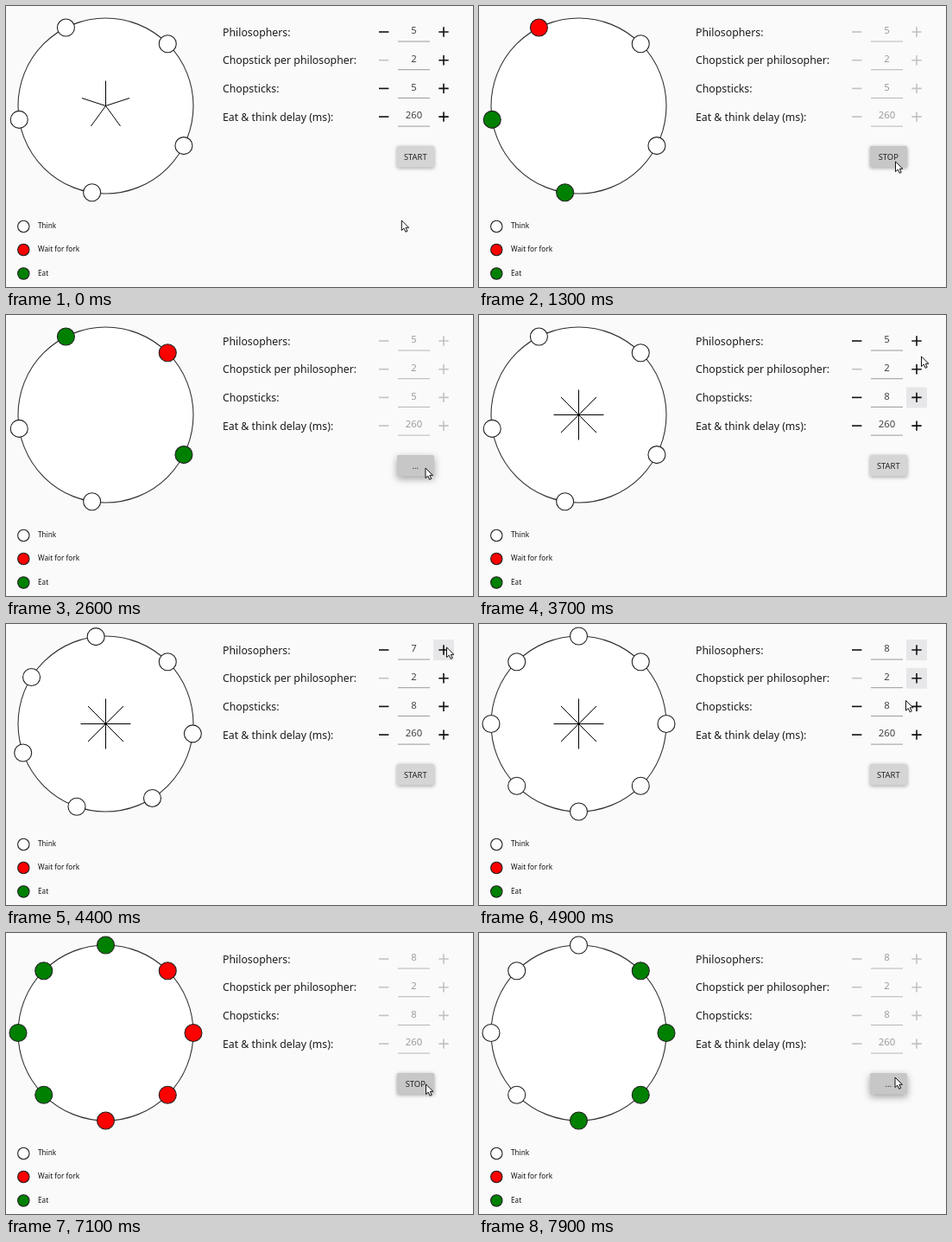
These frames come from a looping animation (541 px wide and 325 px high, 8000 ms). An HTML page:

```html
<!DOCTYPE html>
<html lang="en">
<head>
<meta charset="utf-8">
<title>Dining philosophers</title>
<style>
  html, body { margin: 0; width: 100%; height: 100%; overflow: hidden; background: #fafafa; }
  svg { display: block; width: 541px; height: 325px; font-family: "Noto Sans", "Open Sans", sans-serif; }
  .label { font-size: 12.3px; fill: #1c1c1c; }
  .value { font-size: 11.4px; text-anchor: middle; }
  .legend { font-size: 8.2px; font-weight: 500; fill: #111; }
  .caption { font-size: 9.4px; text-anchor: middle; fill: #222; }
</style>
</head>
<body>
<svg id="stage" viewBox="0 0 541 325"></svg>
<script>
const LOOP = 8000, STEP = 100;
const CENTER = 115.5, TABLE_R = 101.5, STICK = 29;
const FILL = { t: '#fff', w: '#f00', e: '#008000' };
const stage = document.getElementById('stage');

function add(tag, attrs, parent = stage, text) {
  const node = document.createElementNS('http://www.w3.org/2000/svg', tag);
  set(node, attrs);
  if (text) node.textContent = text;
  parent.appendChild(node);
  return node;
}
function set(node, attrs) {
  for (const key in attrs) node.setAttribute(key, attrs[key]);
}
const polar = (deg, r) => {
  const a = deg * Math.PI / 180;
  return [CENTER + r * Math.cos(a), CENTER + r * Math.sin(a)];
};
const within = (t, from, to) => t >= from && t < to;

// Last entry of [time, value] pairs that has already begun.
const latest = (track, t) => track.filter(([at]) => at <= t).pop()[1];

// Eased position along [time, x, y] points.
function along(points, t) {
  const i = points.findIndex(p => p[0] > t);
  if (i < 0) return points[points.length - 1].slice(1);
  if (i === 0) return points[0].slice(1);
  const [a, b] = [points[i - 1], points[i]];
  const k = (t - a[0]) / (b[0] - a[0]);
  const ease = k * k * (3 - 2 * k);
  return [1, 2].map(n => a[n] + (b[n] - a[n]) * ease);
}

const philosopherCount = [[0, 5], [4200, 6], [4400, 7], [4600, 8]];
const chopstickCount = [[0, 5], [3300, 6], [3500, 7], [3700, 8]];
const captions = [[0, 'START'], [800, 'STOP'], [2400, '...'], [2900, 'START'], [6000, 'STOP'], [7700, '...']];

// One letter per philosopher: think, wait, eat.
const firstHalf = 'eeeetttt', secondHalf = 'tttteeee';
const moods = [
  [0, ''], [1000, 'eewww'], [1300, 'tteew'], [1500, 'wette'], [1800, 'etwet'],
  [2000, 'twete'], [2300, 'wteew'], [2500, 'wette'], [2800, ''],
  [6200, 'eeeewwww'], [6400, secondHalf], [6700, firstHalf], [6900, secondHalf],
  [7100, 'wwwweeee'], [7200, firstHalf], [7400, secondHalf], [7700, firstHalf]
];

const cursorPath = [
  [200, 458.3, 248], [700, 480, 180], [1300, 482.5, 180], [2200, 482.5, 180],
  [2600, 486, 177], [2800, 482, 171], [2900, 476, 163], [3100, 505, 97], [3600, 505, 97],
  [3700, 512.5, 48], [3900, 510.5, 27], [4600, 510.5, 27], [4900, 494.5, 88.5],
  [5500, 486, 182], [5900, 486.5, 178], [6200, 486.5, 175], [7300, 486.5, 175],
  [7500, 489, 172], [7900, 482, 167]
];

add('circle', { cx: CENTER, cy: CENTER, r: TABLE_R, fill: '#fff', stroke: '#333', 'stroke-width': 1.1 });
const sticks = add('path', { fill: 'none', stroke: '#000', 'stroke-width': 1 });
const seats = Array.from({ length: 8 }, () =>
  add('circle', { r: 10, stroke: '#222', 'stroke-width': 1.1 }));

[['Think', 't', 255], ['Wait for fork', 'w', 282], ['Eat', 'e', 309.5]].forEach(([name, mood, y]) => {
  add('circle', { cx: 20.3, cy: y, r: 6.7, fill: FILL[mood], stroke: '#222', 'stroke-width': 1.1 });
  add('text', { x: 37, y: y + 2.2, class: 'legend' }, stage, name);
});

// hover: spans during which the plus button is highlighted
const fields = [
  { label: 'Philosophers:', value: t => latest(philosopherCount, t), hover: [[3800, 5000]] },
  { label: 'Chopstick per philosopher:', value: () => 2, locked: true, hover: [[4800, 5100]] },
  { label: 'Chopsticks:', value: t => latest(chopstickCount, t), hover: [[2900, 3900], [5000, 5200]] },
  { label: 'Eat & think delay (ms):', value: () => 260, hover: [] }
].map((field, i) => {
  const y = 30 + i * 32.7;
  const icon = d => add('path', { d, fill: 'none', 'stroke-width': 1.6 });
  add('text', { x: 251, y: y + 4.7, class: 'label' }, stage, field.label);
  return {
    ...field,
    glow: add('rect', { x: 495, y: y - 12, width: 24, height: 24, rx: 1, fill: '#e7e7e9' }),
    minus: icon(`M432 ${y}h11.4`),
    plus: icon(`M501.3 ${y}h11.4M507 ${y - 5.7}v11.4`),
    line: add('path', { d: `M454 ${y + 11}h37`, 'stroke-width': 1 }),
    text: add('text', { x: 472.5, y: y + 2.2, class: 'value' })
  };
});

const button = add('rect', { x: 453, y: 162, width: 43, height: 24.5, rx: 1.5 });
const caption = add('text', { x: 474.3, y: 177.8, class: 'caption' });
const cursor = add('path', {
  d: 'M0 0V11.6L2.7 9.1 4.7 13.3 6.7 12.4 4.8 8.3H8.4Z',
  fill: '#fff', stroke: '#111', 'stroke-width': 1, 'stroke-linejoin': 'round'
});

function drawTable(t) {
  const mood = latest(moods, t);
  const people = latest(philosopherCount, t);
  const count = latest(chopstickCount, t);
  seats.forEach((seat, i) => {
    const [cx, cy] = polar(-45 + i * 360 / people, TABLE_R);
    set(seat, { cx, cy, fill: FILL[mood[i] || 't'], visibility: i < people ? 'visible' : 'hidden' });
  });
  const lines = Array.from({ length: count }, (_, i) =>
    `M${CENTER} ${CENTER}L${polar(-90 + i * 360 / count, STICK)}`);
  set(sticks, { d: mood ? '' : lines.join('') });
}

function drawForm(t) {
  const title = latest(captions, t);
  const running = title !== 'START';
  const ink = off => off ? '#c2c2c2' : '#111';
  fields.forEach(f => {
    set(f.glow, { visibility: f.hover.some(([a, b]) => within(t, a, b)) ? 'visible' : 'hidden' });
    set(f.minus, { stroke: ink(running || f.locked) });
    set(f.plus, { stroke: ink(running) });
    set(f.line, { stroke: running ? '#b5b5b5' : '#999' });
    set(f.text, { fill: running ? '#9c9c9c' : '#444' });
    f.text.textContent = f.value(t);
  });
  const hovered = within(t, 600, 2900) || t >= 5500;
  button.style.fill = hovered ? '#c7c7c7' : '#d5d5d5';
  button.style.filter = title === '...'
    ? 'drop-shadow(0 3px 4px rgba(0,0,0,.36))'
    : 'drop-shadow(0 1px 2px rgba(0,0,0,.36))';
  caption.textContent = title;
}

function render(time) {
  const t = Math.floor((time % LOOP) / STEP) * STEP;
  drawTable(t);
  drawForm(t);
  set(cursor, { transform: `translate(${along(cursorPath, t)})` });
}

let began;
function tick(now) {
  began ??= now;
  render(now - began);
  requestAnimationFrame(tick);
}
render(0);
requestAnimationFrame(tick);
</script>
</body>
</html>
```
